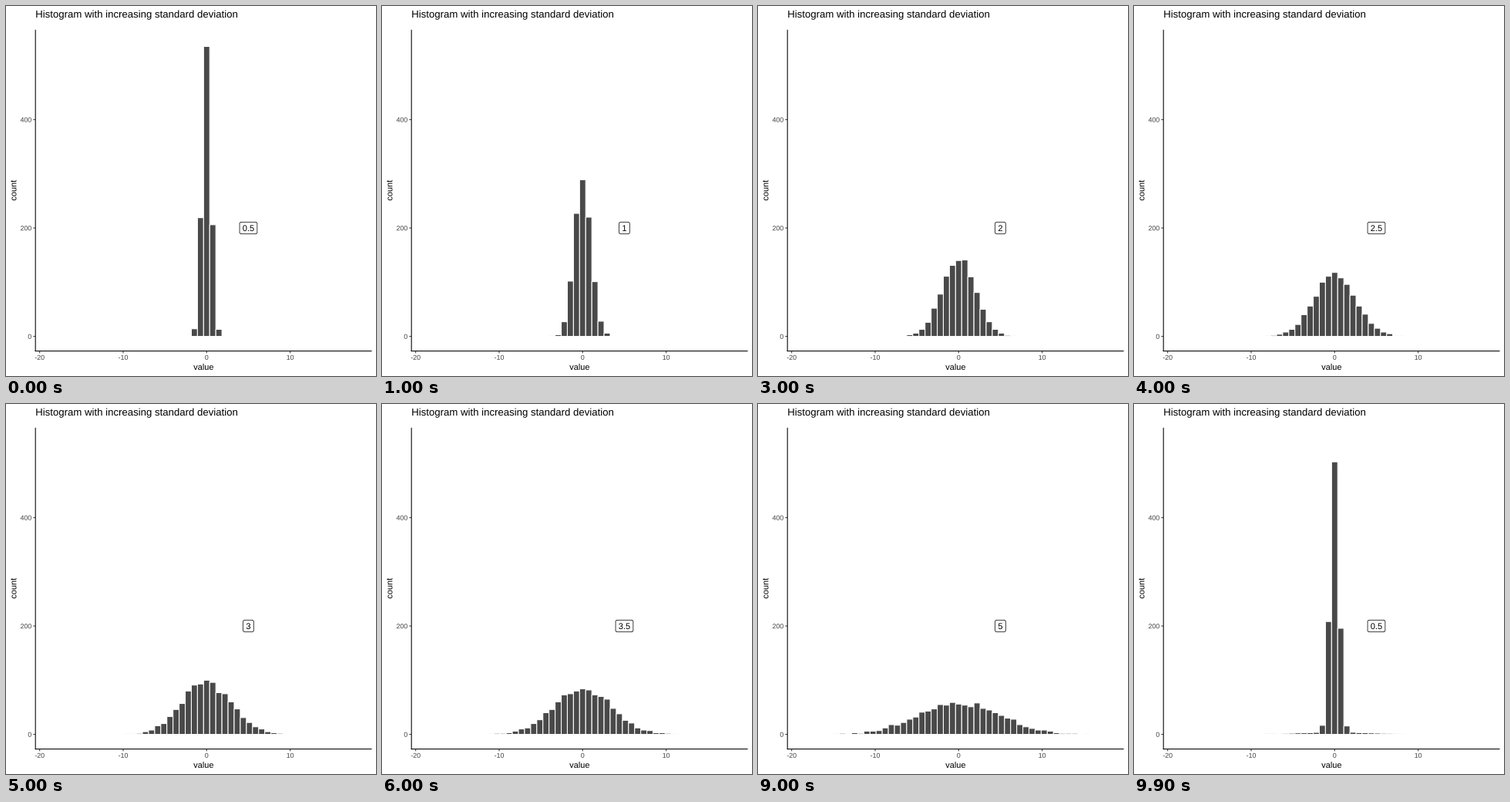
Recreate the animation shown at these times as a matplotlib script. Size 480 px wide and 480 px high, loop 10000 ms.

```python
import math

import matplotlib.pyplot as plt
import numpy as np
from matplotlib.animation import FuncAnimation
from matplotlib.patches import FancyBboxPatch, PathPatch, Rectangle
from matplotlib.textpath import TextPath
from matplotlib.transforms import Affine2D

SIZE = 480
DPI = 72
PER_STATE = 10              # frames from one state to the next
LEFT, RIGHT = 38.2, 474.5   # panel edges in pixels
TOP, BOTTOM = 30.8, 447.6
BASE = 428.6                # pixel row of count 0
PER_COUNT = 0.703
ZERO = 260.3                # pixel column of value 0
PER_UNIT = 10.83
BIN = 7.932
BINS = np.arange(-25, 25)   # bin 0 is centred on value 0
SAMPLES = 1000
SDS = [0.5 * (i + 1) for i in range(10)]

plt.rcParams["font.family"] = "Liberation Sans"
rng = np.random.default_rng(7)


def normal_cdf(z):
    return 0.5 * (1 + math.erf(z / math.sqrt(2)))


def sample_counts(sd):
    """Bin counts of a normal sample, with mild sampling noise."""
    edges = np.append(BINS - 0.5, BINS[-1] + 0.5) * BIN / PER_UNIT
    share = np.diff([normal_cdf(edge / sd) for edge in edges])
    noise = 0.4 * np.sqrt(SAMPLES * share) * (1 - share)
    counts = SAMPLES * share + noise * rng.standard_normal(len(BINS))
    return np.maximum(np.round(counts), 0)


COUNTS = [sample_counts(sd) for sd in SDS]

fig = plt.figure(figsize=(SIZE / DPI, SIZE / DPI), dpi=DPI, facecolor="white")
ax = fig.add_axes([0, 0, 1, 1])
ax.set_xlim(0, SIZE)
ax.set_ylim(SIZE, 0)
ax.axis("off")


def line(xs, ys, color="black"):
    ax.plot(xs, ys, color=color, lw=1.07, solid_capstyle="butt",
            snap=False, zorder=3)


def text_shape(s, size, align):
    """Text outline, shifted left by a share of its advance width."""
    def right(t):
        return TextPath((0, 0), t, size=size).get_extents().x1

    advance = right(s + "l") - right("l")
    return TextPath((-align * advance, 0), s, size=size)


def text(x, y, s, size, align=0.5, color="black", angle=0):
    place = Affine2D().scale(1, -1).rotate_deg(-angle).translate(x, y)
    patch = PathPatch(text_shape(s, size, align), fc=color, lw=0, snap=False,
                      transform=place + ax.transData, zorder=5)
    return ax.add_patch(patch)


bars = [ax.add_patch(Rectangle((ZERO + (i - 0.5) * BIN, BASE), BIN, 0,
                               fc="#494949", ec="white", lw=1.07,
                               joinstyle="miter", snap=False, zorder=2))
        for i in BINS]

line([LEFT, LEFT], [TOP, BOTTOM + 0.5])
line([LEFT - 0.5, RIGHT], [BOTTOM, BOTTOM])
for value in range(-20, 11, 10):
    x = ZERO + value * PER_UNIT
    line([x, x], [BOTTOM, BOTTOM + 2.75], "#333333")
    text(x, 458.9, str(value), 8.8, color="#404040")
for count in range(0, 401, 200):
    y = BASE - count * PER_COUNT
    line([LEFT - 2.75, LEFT], [y, y], "#333333")
    text(LEFT - 4.95, y + 3.2, str(count), 8.8, align=1, color="#404040")

text(LEFT, 15, "Histogram with increasing standard deviation", 13.2, align=0)
text((LEFT + RIGHT) / 2, 472, "value", 11)
text(13.4, (TOP + BOTTOM) / 2, "count", 11, angle=90)

LABEL_X = ZERO + 5 * PER_UNIT
LABEL_Y = BASE - 200 * PER_COUNT
LABEL_SIZE = 11.04
label_box = FancyBboxPatch((LABEL_X, LABEL_Y - 7.7), 1, 15.4,
                           boxstyle="round,pad=0,rounding_size=2.2",
                           fc="white", ec="black", lw=0.75, snap=False,
                           zorder=4)
ax.add_patch(label_box)
label_text = text(LABEL_X, LABEL_Y + 4, "0", LABEL_SIZE)


def progress(frame):
    """State index and sine-eased progress towards the next state."""
    state, step = divmod(frame, PER_STATE)
    hold = 3 if state == 0 else 4
    t = max(0, (step - hold) / (PER_STATE - hold))
    return state, 0.5 * (1 - math.cos(math.pi * t))


def draw(frame):
    state, p = progress(frame)
    after = (state + 1) % len(SDS)
    heights = COUNTS[state] * (1 - p) + COUNTS[after] * p
    for bar, height in zip(bars, heights):
        bar.set_height(-height * PER_COUNT)

    caption = f"{SDS[after if p >= 0.5 else state]:g}"
    width = 22.8 if "." in caption else 13.7
    label_text.set_path(text_shape(caption, LABEL_SIZE, 0.5))
    label_box.set_x(LABEL_X - width / 2)
    label_box.set_width(width)
    return [*bars, label_box, label_text]


anim = FuncAnimation(fig, draw, frames=PER_STATE * len(SDS), interval=100,
                     repeat=True, repeat_delay=0, blit=False)
plt.show()
```
